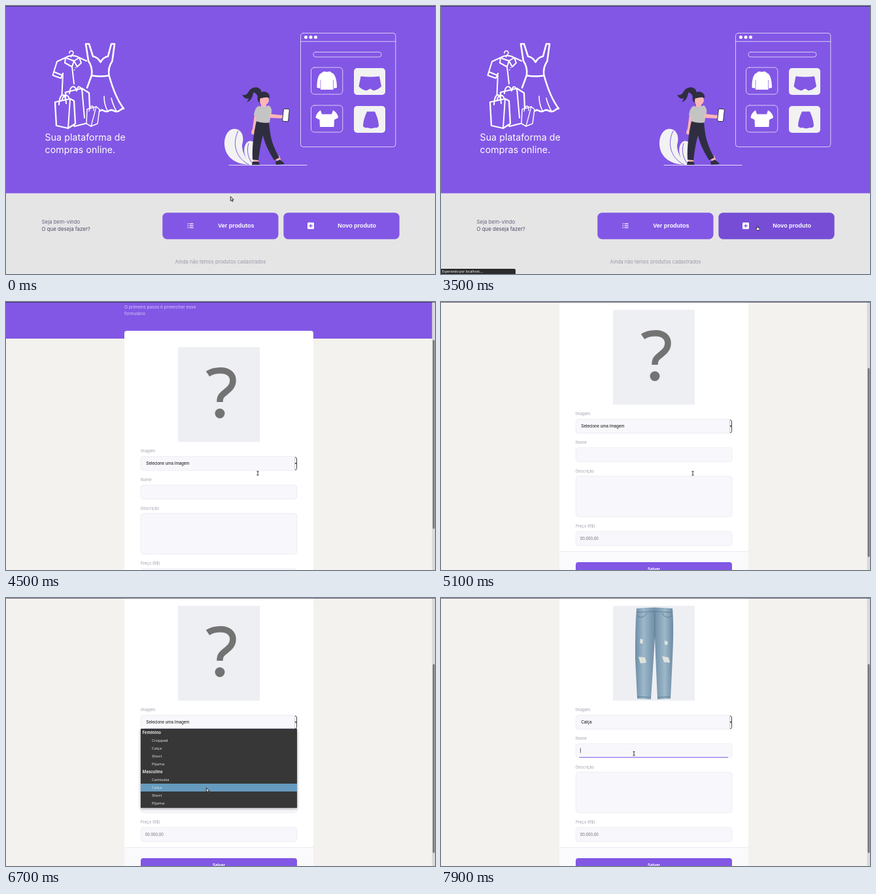
An HTML page for the animation above (8000 ms loop, 656x410 px).

```html
<!DOCTYPE html>
<html lang="pt-BR">
<head>
<meta charset="utf-8">
<title>Loja</title>
<style>
html, body { margin: 0; width: 100%; height: 100%; overflow: hidden; background: #e5e5e5; }
svg { display: block; width: 100%; height: 100%; }
text { font-family: Inter, sans-serif; }
.sans { font-family: "Liberation Sans", Arial, sans-serif; }
.bold { font-weight: bold; }
.menu { font-family: "Noto Sans", sans-serif; font-size: 6.1px; fill: #e4e4e4; }
.label { font-size: 5.9px; fill: #a29fac; }
.field { fill: #f8f8fc; stroke: #e8e8f1; stroke-width: .8; }
.line { fill: none; stroke: #fff; stroke-linejoin: round; stroke-linecap: round; }
</style>
</head>
<body>
<svg viewBox="0 0 656 410">
  <defs>
    <linearGradient id="denim">
      <stop offset="0" stop-color="#6f8da6"/><stop offset=".22" stop-color="#9db8ca"/>
      <stop offset=".48" stop-color="#7593ac"/><stop offset=".55" stop-color="#7896ae"/>
      <stop offset=".78" stop-color="#9db8ca"/><stop offset="1" stop-color="#6d8aa3"/>
    </linearGradient>
    <filter id="soft" x="-10%" y="-10%" width="120%" height="120%"><feGaussianBlur stdDeviation="2"/></filter>
  </defs>

  <g id="home">
    <rect width="656" height="410" fill="#e5e5e5"/>
    <rect width="656" height="286.5" fill="#8257e5"/>

    <g class="line" stroke-width="2">
      <path d="M97 72C96 68 103 67 103 72C103 75 99 74 99.5 78" stroke-width="1.6"/>
      <path d="M91 79L78 85L71.500 106L84 110.500L87 103L85.500 136M91 79C97 75 106 75 112 79L123 84M91 79L90 87L101 93L104 84L112 79M93 80L104 84L109 93L115 87L112 79M101 93L104 119M74 101L86 106" stroke-width="2"/>
      <path d="M104 98L105.500 97.500M106 94.500L107 94" stroke-width="1.2"/>
      <path d="M122 58H127L133 77C138 78 142 81 144.500 86C147 81 151 78 156 77L161 58H166L162.500 84C158 91 156 98 157.500 106C163 126 170 144 180 157C176 156 174 162 169 161.500C164 161 162 157 158 160C154 162.500 150 161 147 159L142 161M122 58L126 84C131 91 132 98 131 106L124 125M131 106.500C140 108 149 108 157.500 106.500" stroke-width="2.6"/>
      <path d="M150 138C150 147 152 154 155 160M161 141C163 149 166 156 169 161" stroke-width="1.6"/>
      <g fill="#8257e5">
        <path d="M91 132L116 126L127 133L129 178L105 184L91 174Z" stroke-width="2.3"/>
        <path d="M116 126L120 171M97 134C98 121 105 120 108 130M108 130C109 121 115 121 117 133" fill="none"/>
        <path d="M75 147L98 142L104 145L106 180L95 187L77 183Z" stroke-width="2.3"/>
        <path d="M98 142L95 187M81 151C82 132 91 131 92 149M86 143C88 135 94 134 97 142" fill="none"/>
        <path d="M124 158L138 154L143 158L140 180L130 184L123 180Z" stroke-width="1.5"/>
        <path d="M138 154L130 184M127 161C129 150 135 151 134 160" fill="none" stroke-width="1.3"/>
      </g>
    </g>
    <g fill="#fff" font-size="14.1" letter-spacing=".1">
      <text x="59.5" y="205.5">Sua plataforma de</text>
      <text x="59.5" y="225">compras online.</text>
    </g>

    <g id="window">
      <g class="line" stroke-width=".7">
        <rect x="450.5" y="41.5" width="145.3" height="174" rx="4"/>
        <path d="M450.5 54.3H595.800"/>
        <rect x="470" y="70.5" width="104" height="7.5" rx="3.7"/>
        <rect x="466.5" y="94" width="48.3" height="41" rx="5"/>
        <rect x="466.5" y="152" width="48.3" height="41" rx="5"/>
      </g>
      <g fill="#fff">
        <circle cx="458.5" cy="47.700" r="2.500"/><circle cx="466" cy="47.700" r="2.500"/><circle cx="473.500" cy="47.700" r="2.500"/>
        <path d="M486 100Q490.500 101.500 495 100L501 104C505 109 506 117 506 125L501.500 126L500.500 125V128H481V125L480 126L475.500 125C475.500 117 476 109 480 104Z"/>
        <path d="M481 159.500L483 165.500H498L500 159.500C505 162 508 167 508 171L502 174L501.500 185H480L479.500 174L473.500 171C474 166 477 162 481 159.500Z"/>
      </g>
      <path d="M481 113V125.500M500.500 113V125.500" fill="none" stroke="#8257e5" stroke-width=".7"/>
      <rect x="532" y="95" width="48" height="41" rx="5" fill="#f2f2f2"/>
      <rect x="532" y="153" width="48" height="41" rx="5" fill="#f2f2f2"/>
      <g fill="#8257e5">
        <path d="M542.500 107.500Q557 109.500 571 107.500L574 123Q569 128 562 129.500L557 126.500L551 129.500Q544 128 539.500 123Z"/>
        <path d="M552 161.500H564C568 170 570 178 570 184Q567 187.500 564 186Q558 188.500 553 186Q549 187.500 546 184C546 178 548 170 552 161.500Z"/>
      </g>
    </g>

    <g id="shopper">
      <g fill="#f2f2f2">
        <path d="M376 243C347 243 334 228 334 210C334 196 342 187 350 188C361 189 365 200 361 213C361 223 366 234 376 243Z"/>
        <path d="M374 243C362 231 361 212 371 207C380 204 386 216 386 227C386 236 381 242 374 243Z"/>
      </g>
      <path d="M355 191C345 212 352 233 372 243M371 210C367 222 371 235 378 242" fill="none" stroke="#8257e5"/>
      <path d="M341 243.500H460" class="line" stroke-width=".8"/>
      <g fill="#ffb6b6">
        <path d="M378 232H386V240H378ZM411 231L418 229L421 237L415 239Z"/>
        <path d="M380 166L387 167L381 191C382 196 379 198 376 196C374 194 376 190 377 188Z"/>
        <path d="M390 145H398V155H390Z"/>
        <circle cx="394.500" cy="144" r="7.500"/>
      </g>
      <g fill="#2f2e41">
        <path d="M383 176L402 178C404 194 404 207 418 232L410 236C400 220 396 210 393 198C389 212 388 222 386 236L377 235C376 215 379 193 383 176Z"/>
        <path d="M377 238H386L388 243H376ZM412 238L419 235L426 241L424 242L413 243Z"/>
        <path d="M385 145C383 135 388 131 394 131C401 131 404 137 403 141C398 138 392 141 389 141C388 143 388 146 388.500 149Z"/>
        <path d="M386 140C383 134 380 131 378 133C377 141 373 146 368 147C370 145 371 143 371 141C368 143 364 141 361 136C366 137 369 135 371 131C374 125 382 123 387 126C391 128 391 132 389 135Z"/>
      </g>
      <path d="M386 153C392 155 398 154 402 152C407 156 407 162 405 167L403 178C396 180 388 178 382 176L383 169L379 167C380 160 382 155 386 153Z" fill="#c4c4c4"/>
      <path d="M403 165L421 167L426 165L428 170L421 172L403 171Z" fill="#ffb6b6"/>
      <rect x="423.500" y="157.500" width="9" height="19" rx="1.500" fill="#fff" stroke="#2f2e41" transform="rotate(6 428 167)"/>
    </g>

    <g font-size="7.900">
      <text x="54.500" y="333.300" fill="#6a6180">Seja bem-vindo</text>
      <text x="54.500" y="344.300" fill="#4e4a66">O que deseja fazer?</text>
    </g>
    <rect id="list" x="239.300" y="316.200" width="177.200" height="40.500" rx="7"/>
    <rect id="add" x="424.400" y="316.200" width="177.200" height="40.500" rx="7"/>
    <g fill="#fff">
      <path d="M277.500 332.500h1.500v1.300h-1.500zm0 3h1.500v1.300h-1.500zm0 3h1.500v1.300h-1.500zm3 -6h6v1.300h-6zm0 3h6v1.300h-6zm0 3h6v1.300h-6z"/>
      <rect x="461" y="331.300" width="10" height="10" rx="1.300"/>
      <g font-size="8.950">
        <text class="sans bold" x="324.300" y="339.300">Ver produtos</text>
        <text class="sans bold" x="507.300" y="339.300">Novo produto</text>
      </g>
    </g>
    <path d="M466 333.500V339M463.200 336.300H468.800" stroke="#774dd6" stroke-width="1.300"/>
    <text x="328" y="393.500" text-anchor="middle" font-size="7.500" fill="#9d99a7">Ainda não temos produtos cadastrados</text>

    <g id="status">
      <path d="M0 402H112Q114 402 114 404V410H0Z" fill="#2c2c2c"/>
      <text id="statusText" class="menu" x="1.500" y="408" style="font-size:5.05px;font-weight:500;fill:#fff"></text>
    </g>
  </g>

  <g id="form">
    <rect width="656" height="410" fill="#f4f2ee"/>
    <g id="page">
      <rect y="-134" width="652" height="133" fill="#8257e5"/>
      <text class="sans bold" x="181" y="-68" font-size="14" fill="#fff">Adicione um produto</text>
      <g font-size="6.600" fill="#d9c8fa">
        <text x="181" y="-46.700">O primeiro passo é preencher esse</text>
        <text x="181" y="-36.700">formulário</text>
      </g>
      <rect x="181" y="-13" width="289" height="470" rx="4" fill="#fff"/>
      <rect x="181" y="381.500" width="289" height="60" fill="#fafafc"/>
      <path d="M181 381.500H470" stroke="#ebebf2"/>
      <rect x="263" y="12" width="125" height="145" fill="#eeeff3"/>
      <g id="unknown">
        <path d="M308.500 53C315 48.500 322 47.700 328 47.700C340 47.700 347 54 347 63C347 73 340 77 333 83C328 87 327 90 327 96" fill="none" stroke="#737373" stroke-width="9.500"/>
        <circle cx="327" cy="113.500" r="7.500" fill="#737373"/>
      </g>
      <g id="jeans">
        <path d="M299 16Q326 13 354 16C356 42 355 70 354 92L351 154L331 155L327 62L321 155L300 154L297 92C297 66 297 40 299 16Z" fill="url(#denim)"/>
        <path d="M299 22Q326 19 354 22M327 20V60M300 27Q308 34 315 23M338 23Q344 34 354 27M300 151L321 152M331 152L351 151" fill="none" stroke="#58758e" stroke-width=".8"/>
        <path d="M302 90L312 91L314 99L305 100ZM338 89L348 91L350 99L341 98ZM305 62L309 64L308 70L304 69ZM342 65L347 67L346 72L342 71Z" fill="#dfe3dc"/>
      </g>

      <g class="label">
        <text x="206" y="173">Imagem</text>
        <text x="206" y="216.700">Nome</text>
        <text x="206" y="260.700">Descrição</text>
        <text x="206" y="345.200">Preço (R$)</text>
      </g>
      <g class="field">
        <rect x="206.400" y="179.400" width="238.500" height="21.300" rx="4"/>
        <rect x="206.400" y="223" width="238.500" height="21.300" rx="4"/>
        <rect x="206.400" y="266.400" width="238.500" height="62" rx="4"/>
        <rect x="206.400" y="351" width="238.500" height="21.500" rx="4"/>
      </g>
      <path d="M441.500 180V200" stroke="#c9c9cf" stroke-width=".8"/>
      <path d="M442 180.500Q444.500 180.500 444.500 183V197.500Q444.500 200 442 200" fill="none" stroke="#333" stroke-width=".9"/>
      <path d="M441.700 189.300H444.300L443 191.200Z"/>
      <g font-size="6.300">
        <text id="choice" class="sans" x="214.300" y="191.900" fill="#111"></text>
        <text class="sans" x="212.700" y="364" fill="#77757d">00.000,00</text>
      </g>
      <path id="selectFocus" d="M211 200.300H440" stroke="#8257e5"/>
      <path id="nameFocus" d="M211.500 243.800H439" stroke="#8257e5"/>
      <path id="caret" d="M213.300 229.500V237" stroke="#222" stroke-width=".7"/>
      <rect x="206" y="398" width="239" height="24" rx="4" fill="#8257e5"/>
      <text class="sans bold" x="325.500" y="410.700" text-anchor="middle" font-size="6.300" fill="#fff">Salvar</text>
    </g>
    <g id="menu">
      <rect x="206" y="202" width="239" height="120" fill="#000" opacity=".4" filter="url(#soft)"/>
      <rect x="206" y="200" width="239" height="121" fill="#373737"/>
      <rect id="row" x="206" width="239" height="12" fill="#669bbf"/>
      <g id="options"></g>
    </g>
    <rect x="651.500" width="4.500" height="410" fill="#d9d9d9"/>
    <rect id="thumb" x="652.500" width="3" height="289" rx="1.500" fill="#777"/>
  </g>

  <rect width="656" height="1" fill="#1c1630" opacity=".6"/>
  <g id="arrow"><path d="M.4 .4V7.200L1.900 5.800L3 8.200L4.200 7.600L3.100 5.300H5.200Z" fill="#dcdce0" stroke="#1c1c22" stroke-width=".85"/></g>
  <g id="hand"><path d="M-1 .5C-.5 -.3 .3 0 .4 .8V3L3 3.700C3.500 4.500 3 6 2.500 7H-1.200L-3 4.500C-2.500 3.800 -1.600 4.200 -1 4.800Z" fill="#fff" stroke="#111" stroke-width=".8"/></g>
  <g id="ibeam"><path d="M-1.600 -2.900H1.600M0 -2.900V2.900M-1.600 2.900H1.600" fill="none" stroke="#222" stroke-width=".9"/></g>
</svg>
<script>
const LOOP = 8000, STEP = 100, SCROLL_END = 134;
const $ = id => document.getElementById(id);
const show = (id, on) => $(id).setAttribute('display', on ? 'inline' : 'none');
const ramp = (t, a, b) => Math.min(1, Math.max(0, (t - a) / (b - a)));

// Each key: time, then values
const pointer = [
  [0, 343, 291], [700, 343, 291], [800, 332, 290], [1100, 332, 290],
  [1200, 300, 302], [1400, 172, 357], [1600, 310, 220], [1800, 520, 135],
  [1900, 548, 125], [2000, 478, 195], [2200, 400, 285], [2400, 345, 335],
  [2600, 335, 338], [2900, 478, 337], [3000, 484, 336], [3800, 484, 336],
  [4200, 400, 270], [4400, 385, 262], [5300, 385, 262], [5500, 382, 190],
  [5600, 382, 188], [6100, 382, 188], [6200, 370, 217], [6300, 370, 217],
  [6400, 352, 240], [6600, 312, 282], [6700, 306, 290], [7200, 306, 290],
  [7400, 301, 270], [7600, 296, 243], [7700, 295, 238]
];
const scrolling = [[4300, 0], [4400, 32], [4500, 77], [4700, 108], [4900, 127], [5100, SCROLL_END]];

function sample(keys, t) {
  const next = keys.findIndex(k => k[0] > t);
  if (next < 0) return keys[keys.length - 1].slice(1);
  if (next === 0) return keys[0].slice(1);
  const a = keys[next - 1], b = keys[next], p = ramp(t, a[0], b[0]);
  return a.slice(1).map((v, i) => v + (b[i + 1] - v) * p);
}

function shade(p) {
  const from = [130, 87, 229], to = [119, 77, 214];
  return `rgb(${from.map((v, i) => Math.round(v + (to[i] - v) * p))})`;
}

const garments = ['Calça', 'Short', 'Pijama'];
['Feminino', 'Cropped', ...garments, 'Masculino', 'Camiseta', ...garments].forEach((name, i) => {
  const el = document.createElementNS('http://www.w3.org/2000/svg', 'text');
  const heading = i % 5 === 0;
  el.setAttribute('class', heading ? 'menu bold' : 'menu');
  el.setAttribute('x', heading ? 208.5 : 223);
  el.setAttribute('y', 208.2 + i * 11.97);
  el.textContent = name;
  $('options').append(el);
});

function cursorKind(t) {
  if (t >= 2300 && t < 3800) return 'hand';
  return (t >= 4400 && t < 5400) || t >= 7600 ? 'ibeam' : 'arrow';
}

function statusText(t) {
  if (t < 2400) return '';
  if (t < 2900) return 'localhost:3000/produtos';
  return t < 3400 ? 'localhost:3000/cadastro' : 'Esperando por localhost....';
}

function draw(t) {
  const onForm = t >= 3800, picked = t >= 7000, typing = t >= 7900;
  show('home', !onForm);
  show('form', onForm);

  $('list').setAttribute('fill', shade(ramp(t, 2200, 2500) - ramp(t, 2900, 3200)));
  $('add').setAttribute('fill', shade(ramp(t, 2900, 3200)));
  const status = statusText(t);
  show('status', status);
  $('statusText').textContent = status;

  const [scroll] = sample(scrolling, t);
  $('page').setAttribute('transform', `translate(0 ${SCROLL_END - scroll})`);
  $('thumb').setAttribute('y', scroll * .754);

  show('unknown', !picked);
  show('jeans', picked);
  $('choice').textContent = picked ? 'Calça' : 'Selecione uma Imagem';
  show('selectFocus', t >= 5400 && !typing);
  show('nameFocus', typing);
  show('caret', typing);

  const [x, y] = sample(pointer, t);
  show('menu', t >= 5900 && !picked);
  show('row', t >= 6400);
  $('row').setAttribute('y', 200 + Math.floor((y - 200) / 12) * 12);

  const kind = cursorKind(t);
  for (const id of ['arrow', 'hand', 'ibeam']) show(id, id === kind);
  $(kind).setAttribute('transform', `translate(${x} ${y})`);
}

const start = performance.now();
function tick() {
  const t = (performance.now() - start) % LOOP;
  draw(Math.floor(t / STEP) * STEP);
  requestAnimationFrame(tick);
}
tick();
</script>
</body>
</html>
```
